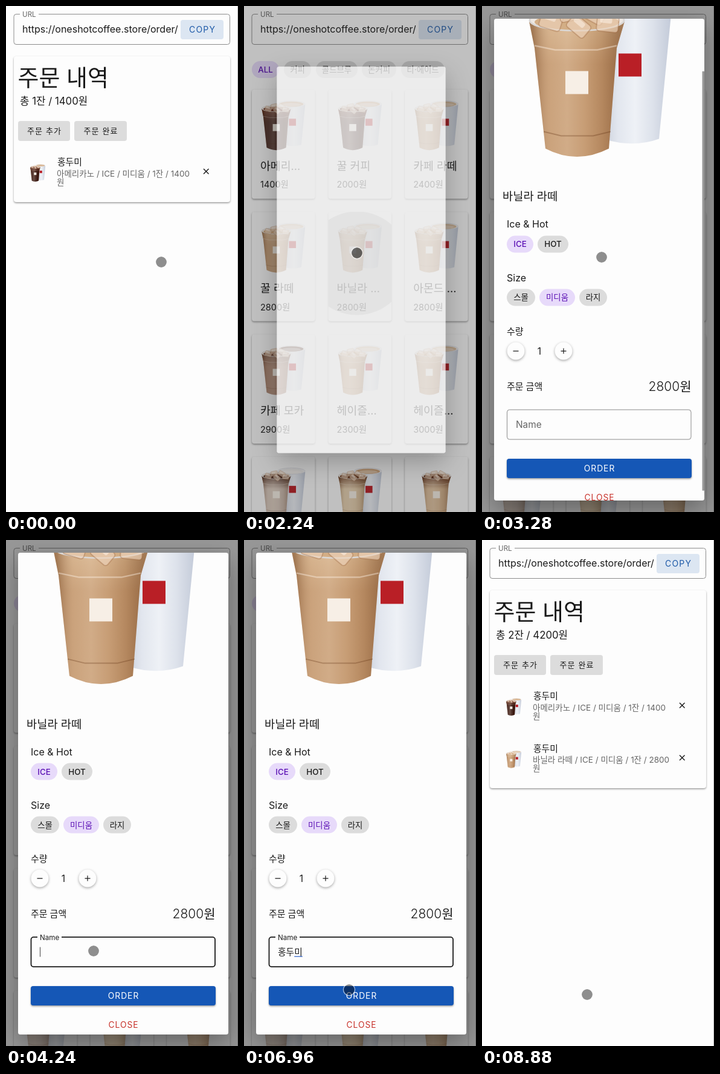
An HTML page with a canvas for the animation above (8.96 s loop, 384 by 836 pixels).

```html
<!DOCTYPE html>
<html lang="ko">
<head>
<meta charset="utf-8">
<title>Order</title>
<style>
  html, body { margin: 0; width: 100%; height: 100%; overflow: hidden; background: #fdfdfd; }
  canvas { display: block; width: 384px; height: 836px; }
</style>
</head>
<body>
<canvas id="stage"></canvas>
<script>
const W = 384, H = 836, LOOP = 8960, STEP = 80;
const PAPER = '#fdfdfd', INK = '#1a1a1a', GREY = '#dcdcdc', BLUE = '#1557b6';
const LILAC = '#e7dafa', PURPLE = '#5a0fb4', CUSTOMER = '홍두미';
const canvas = document.getElementById('stage');
const ctx = canvas.getContext('2d');
const dpr = window.devicePixelRatio || 1;
canvas.width = W * dpr;
canvas.height = H * dpr;

const clamp = v => Math.max(0, Math.min(1, v));
const lerp = (a, b, p) => a + (b - a) * p;
const span = (t, from, length) => clamp((t - from) / length);
const smooth = p => p * p * (3 - 2 * p);
const easeOut = p => 1 - (1 - p) ** 2;

// Timeline
const CLICK = { add: 720, drink: 2080, name: 3960, order: 7400 };
const TIME = {
  leave: 880, menu: 1040, open: 2160, content: 2400, scroll: 2960, hideThumb: 3760,
  type: 4800, typed: 6400, close: 8080, list: 8160
};
const POINTER = [
  [0, 257, 423], [600, 57, 206], [1440, 57, 206], [2000, 187, 408], [2400, 187, 408],
  [2720, 198, 415], [3440, 198, 415], [3880, 145, 679], [6400, 145, 679], [6880, 174, 743],
  [6960, 174, 743], [7280, 174, 751]
];
const TYPING = ['ㅎ', '호', '홍', '홍ㄷ', '홍두', '홍둠', CUSTOMER];

// Drinks: colour at the top, colour at the bottom, colour in the paper cup
const AMERICANO = ['#6a3222', '#35140f', '#cfa67d'];
const LATTE = ['#d3ae86', '#c1946a', '#dcc0a1'];
const MOCHA = ['#75503f', '#a47a66', '#5a3526'];
const MENU = [
  ['아메리...', 1400, AMERICANO], ['꿀 커피', 2000, AMERICANO], ['카페 라떼', 2400, LATTE],
  ['꿀 라떼', 2800, LATTE], ['바닐라 ...', 2800, LATTE], ['아몬드 ...', 2800, LATTE],
  ['카페 모카', 2900, MOCHA], ['헤이즐...', 2300, LATTE], ['헤이즐...', 3000, LATTE],
  ['', 0, ['#4b2a20', '#d3c3b8', '#f0eeec']], ['', 0, ['#6a3a20', '#e3cba8', '#cfa67d']],
  ['', 0, ['#5c2c18', '#d9b791', '']]
];

// y is the middle of the capitals
function text(str, x, y, size, { color = INK, align = 'left', spacing = 0, weight = 400 } = {}) {
  ctx.font = `${weight} ${size}px Inter, "Noto Sans CJK KR", sans-serif`;
  ctx.letterSpacing = spacing + 'px';
  ctx.textAlign = align;
  ctx.fillStyle = color;
  ctx.fillText(str, x, y + size * 0.37);
}

function box(x, y, w, h, r, fill) {
  ctx.beginPath();
  ctx.roundRect(x, y, w, h, r);
  ctx.fillStyle = fill;
  ctx.fill();
}

function raised(draw, blur = 3, offset = 1.5, alpha = 0.4) {
  ctx.save();
  ctx.shadowColor = `rgba(0,0,0,${alpha})`;
  ctx.shadowBlur = blur * dpr;
  ctx.shadowOffsetY = offset * dpr;
  draw();
  ctx.restore();
}

const card = (x, y, w, h) => raised(() => box(x, y, w, h, 4, PAPER));

function line(color, width, ...points) {
  ctx.beginPath();
  points.forEach(([x, y], i) => i ? ctx.lineTo(x, y) : ctx.moveTo(x, y));
  ctx.strokeStyle = color;
  ctx.lineWidth = width;
  ctx.stroke();
}

function ellipse(x, y, rx, ry, fill, stroke) {
  ctx.beginPath();
  ctx.ellipse(x, y, rx, ry, 0, 0, Math.PI * 2);
  if (fill) { ctx.fillStyle = fill; ctx.fill(); }
  if (stroke) { ctx.strokeStyle = stroke; ctx.lineWidth = 3; ctx.stroke(); }
}

function outline(x, y, w, h, color, width, gap, gapWidth) {
  ctx.beginPath();
  ctx.roundRect(x, y, w, h, 4);
  ctx.strokeStyle = color;
  ctx.lineWidth = width;
  ctx.stroke();
  if (gapWidth) {
    ctx.fillStyle = PAPER;
    ctx.fillRect(gap, y - 2, gapWidth, 4);
  }
}

function button(label, x, y, w, h, fill, color, size = 14, spacing = 1.2) {
  box(x, y, w, h, 4, fill);
  text(label, x + (w + spacing) / 2, y + h / 2, size, { color, spacing, align: 'center' });
}

function chip(label, x, y, w, active) {
  box(x, y, w, 28, 14, active ? LILAC : GREY);
  text(label, x + w / 2, y + 14, 13.4, { color: active ? PURPLE : INK, align: 'center', weight: 500 });
}

function ripple(t, start, x, y, reach, [bx, by, bw, bh], color = '0,0,0') {
  if (t < start || t > start + 560) return;
  const radius = reach * lerp(0.3, 1, easeOut(span(t, start, 300)));
  const alpha = 0.2 * (1 - span(t, start + 260, 300));
  ctx.save();
  ctx.beginPath();
  ctx.roundRect(bx, by, bw, bh, 4);
  ctx.clip();
  ellipse(x, y, radius, radius, `rgba(${color},${alpha})`);
  ctx.restore();
}

function gradient(x0, y0, x1, y1, ...colors) {
  const g = ctx.createLinearGradient(x0, y0, x1, y1);
  colors.forEach((c, i) => g.addColorStop(i / (colors.length - 1), c));
  return g;
}

function paperCup(foam) {
  ctx.beginPath();
  ctx.moveTo(-31, -115);
  ctx.lineTo(8, 105);
  ctx.quadraticCurveTo(55, 119, 97, 104);
  ctx.lineTo(118, -112);
  ctx.fillStyle = gradient(0, 0, 115, 0, '#c6ccd8', '#e2e6ee', '#eef1f6', '#dde2eb', '#c5ccda');
  ctx.fill();
  ellipse(43, -117, 74, 17, '#f4f4f6', '#dcdee3');
  ellipse(43, -116, 66, 14, foam);
  ellipse(43, -113, 52, 9, 'rgba(255,250,242,.35)');
  box(30, -37, 38, 38, 0, '#b91f26');
}

function clearCup(top, bottom) {
  ctx.beginPath();
  ctx.moveTo(-118, -90);
  ctx.lineTo(-109, -46);
  ctx.lineTo(-91, 120);
  ctx.quadraticCurveTo(-39, 147, 14, 120);
  ctx.lineTo(27, -46);
  ctx.lineTo(40, -90);
  ctx.fillStyle = gradient(0, -95, 0, 130, top, bottom, bottom, bottom);
  ctx.fill();
  ctx.fillStyle = gradient(-112, 0, 30, 0, 'rgba(80,35,5,.35)', 'rgba(255,240,220,.16)', 'rgba(255,240,220,.26)',
    'rgba(255,240,220,.1)', 'rgba(80,35,5,.1)', 'rgba(80,35,5,.35)');
  ctx.fill();

  ellipse(-39, -92, 78, 17, '#eee8e2', '#dbd8d6');
  ellipse(-39, -89, 70, 13, top);
  for (const [x, y, turn] of [[-82, -90, 0.3], [-50, -104, -0.2], [-10, -102, 0.5], [12, -86, 0.1], [-36, -82, 0.7]]) {
    ctx.save();
    ctx.translate(x, y);
    ctx.rotate(turn);
    box(-18, -13, 36, 26, 5, 'rgba(238,212,188,.65)');
    ctx.strokeStyle = 'rgba(150,95,55,.35)';
    ctx.lineWidth = 2;
    ctx.stroke();
    box(-13, -10, 20, 9, 3, 'rgba(255,246,236,.5)');
    ctx.restore();
  }
  line('rgba(255,245,235,.4)', 2.5, [-109, -50], [-75, -43], [-5, -43], [27, -50]);
  line('rgba(90,45,15,.3)', 2, [-94, 92], [-65, 99], [-12, 99], [17, 92]);
  box(-58, -8, 38, 38, 0, '#f7efe6');
}

function cups(cx, cy, scale, [top, bottom, foam]) {
  ctx.save();
  ctx.translate(cx, cy);
  ctx.scale(scale, scale);
  if (foam) paperCup(foam);
  else ctx.translate(39, 0);
  clearCup(top, bottom);
  ctx.restore();
}

function addressBar() {
  outline(13, 13.5, 357.5, 50, '#8c8c8c', 1, 23, 31);
  text('URL', 27, 14, 11.6, { color: '#666' });
  ctx.save();
  ctx.beginPath();
  ctx.rect(20, 20, 264.5, 40);
  ctx.clip();
  text('https://oneshotcoffee.store/order/', 27, 38.5, 16);
  ctx.restore();
  button('COPY', 289, 23, 71, 32, '#dce6f2', '#1e5aa8');
}

function orderItem(y, details, drink) {
  cups(52.5, y + 18, 0.107, drink);
  text(CUSTOMER, 85, y, 14.8);
  text(details, 84, y + 19, 13.5, { color: '#666' });
  text('원', 84, y + 33, 13.5, { color: '#666' });
  line(INK, 1.4, [327, y + 11], [335.5, y + 19.5]);
  line(INK, 1.4, [335.5, y + 11], [327, y + 19.5]);
}

function orderPage(t, second) {
  card(13, 83, 358, second ? 327 : 241);
  text('주문 내역', 19.5, 117.5, 38);
  text(second ? '총 2잔 / 4200원' : '총 1잔 / 1400원', 23, 156.5, 16.8);
  button('주문 추가', 20, 190, 86, 33, GREY, INK, 13, 1.1);
  button('주문 완료', 113, 190, 87, 33, GREY, INK, 13, 1.1);
  ripple(t, CLICK.add, 57, 206, 55, [20, 190, 86, 33]);
  orderItem(258, '아메리카노 / ICE / 미디움 / 1잔 / 1400', AMERICANO);
  if (second) orderItem(344.5, '바닐라 라떼 / ICE / 미디움 / 1잔 / 2800', LATTE);
}

function menuPage(t) {
  chip('ALL', 13, 91, 45, true);
  chip('커피', 66, 91, 45);
  chip('콜드브루', 119, 91, 69);
  chip('논커피', 195, 91, 57);
  chip('티·에이드', 260, 91, 72);
  MENU.forEach(([name, price, drink], i) => {
    const x = 13 + (i % 3) * 126.6, y = 138 + Math.floor(i / 3) * 202.2;
    card(x, y, 104.5, 180.5);
    cups(x + 52.3, y + 59.5, 0.305, drink);
    if (!name) return;
    text(name, x + 14, y + 126, 18.3);
    text(price + '원', x + 14, y + 157, 14.5);
  });
  ripple(t, CLICK.drink, 187, 425, 101, [139.6, 340.2, 104.5, 180.5]);
}

function nameField(t) {
  const focus = smooth(span(t, CLICK.name, 150));
  outline(41.5, 754.5, 304.5, 49, focus ? INK : '#8c8c8c', lerp(1, 1.8, focus), 52, 40 * focus);
  text('Name', 56, lerp(779, 755.5, focus), lerp(15.4, 11.6, focus), { color: focus ? INK : '#666' });
  if (!focus) return;

  const count = t < TIME.type ? 0 : Math.min(TYPING.length, 1 + Math.floor((t - TIME.type) / 240));
  const value = count ? TYPING[count - 1] : '';
  text(value, 56, 779, 14.8);
  const end = 56 + ctx.measureText(value).width;
  if (value) {
    const start = end - ctx.measureText(value.slice(-1)).width;
    line('#2f62c8', 1.4, [start, 786.5], [end, 786.5]);
  }
  const typing = t >= TIME.type && t < TIME.typed;
  const blinkFrom = t < TIME.typed ? CLICK.name : TIME.typed;
  if (typing || Math.floor((t - blinkFrom) / 500) % 2 === 0 )
    line('#444', 1, [end + 0.5, 771], [end + 0.5, 787]);
}

function roundButton(x, plus) {
  raised(() => ellipse(x, 657.5, 14.5, 14.5, PAPER), 4, 1.5, 0.35);
  line(INK, 1.2, [x - 4.5, 657.5], [x + 4.5, 657.5]);
  if (plus) line(INK, 1.2, [x, 653], [x, 662]);
}

function dialogContent(t) {
  const scroll = 98.4 * easeOut(span(t, TIME.scroll, 480));
  ctx.save();
  ctx.beginPath();
  ctx.roundRect(20, 21, 348, 796, 4);
  ctx.clip();
  ctx.translate(0, -scroll);
  cups(196, 203, 1, LATTE);
  text('바닐라 라떼', 34, 402, 18.7);
  text('Ice & Hot', 41, 448, 16);
  chip('ICE', 41, 467, 44, true);
  chip('HOT', 92, 467, 51);
  text('Size', 41, 536.5, 16);
  chip('스몰', 41, 555, 47);
  chip('미디움', 95, 555, 59, true);
  chip('라지', 161, 555, 46);
  text('수량', 41, 625, 15, { weight: 500 });
  roundButton(56, false);
  text('1', 95, 657.5, 15.5, { align: 'center' });
  roundButton(135, true);
  text('주문 금액', 41, 716, 15, { weight: 500 });
  text('2800원', 346.5, 716, 21, { align: 'right', weight: 300 });
  nameField(t);
  raised(() => box(41, 835.4, 306, 32, 4, BLUE));
  text('ORDER', 194.5, 851.4, 13.8, { color: '#fff', spacing: 1, align: 'center' });
  ripple(t, CLICK.order, 174, 849, 170, [41, 835.4, 306, 32], '255,255,255');
  text('CLOSE', 194.5, 899.6, 13.8, { color: '#c8322b', spacing: 1, align: 'center' });
  ctx.restore();
  if (t < TIME.hideThumb) box(364.5, 30 + scroll * 0.89, 3.5, 693, 1, '#989898');
}

function dialog(t) {
  const shown = t >= TIME.close ? 1 - easeOut(span(t, TIME.close, 200)) : easeOut(span(t, TIME.open, 216));
  if (!shown) return;
  ctx.fillStyle = `rgba(33,33,33,${0.46 * shown})`;
  ctx.fillRect(0, 0, W, H);
  ctx.save();
  ctx.globalAlpha = shown ** 0.6;
  const scale = lerp(0.5, 1, shown);
  ctx.translate(194, 421);
  ctx.scale(scale, scale);
  ctx.translate(-194, -421);

  // The shadow must not show through the translucent panel
  ctx.save();
  ctx.beginPath();
  ctx.rect(-W, -H, W * 3, H * 3);
  ctx.roundRect(20, 21, 348, 796, 4);
  ctx.clip('evenodd');
  raised(() => box(20, 21, 348, 796, 4, PAPER), 42, 14, 0.35);
  ctx.restore();
  box(20, 21, 348, 796, 4, PAPER);
  if (t >= TIME.content) dialogContent(t);
  ctx.restore();
}

function pointer(t) {
  const next = POINTER.findIndex(p => p[0] > t);
  const to = POINTER[next < 0 ? POINTER.length - 1 : next];
  const from = next < 0 ? to : POINTER[next - 1];
  const p = next < 0 ? 1 : smooth(span(t, from[0], to[0] - from[0]));
  const x = lerp(from[1], to[1], p), y = lerp(from[2], to[2], p);
  const pressed = Object.values(CLICK).some(start => t >= start && t < start + 180);
  ellipse(x, y, 9, 9, `rgba(0,0,0,${pressed ? 0.55 : 0.44})`);
  ctx.beginPath();
  ctx.arc(x, y, 9.6, 0, Math.PI * 2);
  ctx.strokeStyle = 'rgba(255,255,255,.6)';
  ctx.lineWidth = 1.3;
  ctx.stroke();
}

function draw(now) {
  const t = Math.floor((now % LOOP) / STEP) * STEP;
  ctx.setTransform(dpr, 0, 0, dpr, 0, 0);
  ctx.fillStyle = PAPER;
  ctx.fillRect(0, 0, W, H);
  addressBar();
  if (t < TIME.leave || t >= TIME.list) orderPage(t, t >= TIME.list);
  else if (t >= TIME.menu) menuPage(t);
  line('#bdbdbd', 1, [383.5, 0], [383.5, H]);
  dialog(t);
  pointer(t);
}

const start = performance.now();
function tick() {
  draw(performance.now() - start);
  requestAnimationFrame(tick);
}
tick();
</script>
</body>
</html>
```
